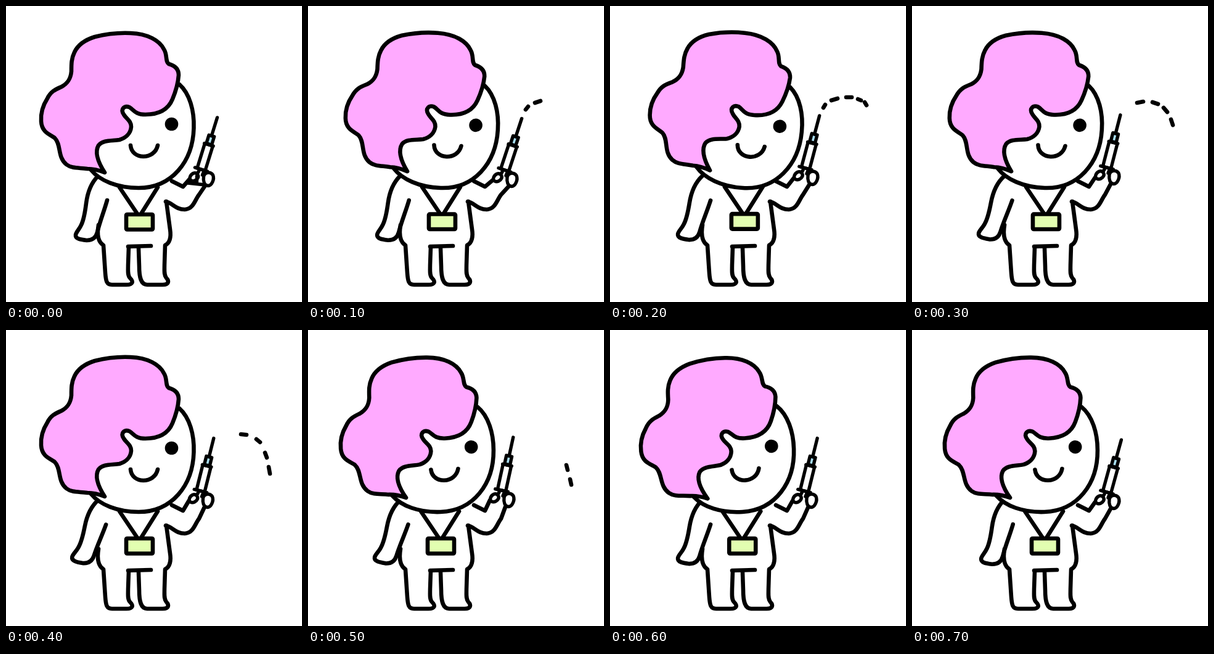
An HTML page that plays this animation: 480x480 px, repeating every 0.8 s.

```html
<!DOCTYPE html>
<html lang="en">
<head>
<meta charset="utf-8">
<title>Nurse with syringe</title>
<style>
  html, body { margin: 0; width: 100%; height: 100%; overflow: hidden; background: #fff; }
  svg { display: block; width: 100%; height: 100%; }
  .ink { fill: none; stroke: #000; stroke-width: 6.6; stroke-linecap: round; stroke-linejoin: round; }
  .thin { stroke-width: 5.4; }
  .white { fill: #fff; }
</style>
</head>
<body>
<svg viewBox="0 0 480 480">
  <g class="ink">
    <!-- legs and torso -->
    <path d="M150 355C147 373 150 383 158 388L161 433C162 446 163 452 172 452H195C206 452 207 447 201 441C197 437 198 429 198 420L199 391"/>
    <path d="M215 393L216 422C216 441 219 452 229 452H254C264 452 265 446 260 441C256 436 257 429 257 420L258 388C266 384 268 375 266 362L260 317"/>
    <path d="M198 390L235 389"/>
    <path id="arm" d="M149 276C137 288 132 304 130 320C128 336 126 347 122 355C119 362 114 366 113 371C112 378 122 379 131 380C141 380 146 375 148 367C152 350 159 333 164 315"/>
    <g id="badge">
      <path d="M184 294L213 337M246 294L219 337"/>
      <rect x="195" y="338" width="43" height="24.500" rx="1.500" fill="#e2feb1"/>
    </g>
    <!-- raised arm -->
    <path id="sleeve"/>
    <g id="head">
      <path class="white" d="M281 127C298 142 305.500 170 304.500 198C303 252 269 295 215 295C180 295 152 283 138 266"/>
      <path fill="#ffaaff" d="M160 270C150 266 142 264 132 264C119 262 107 264 98 257C83 245 90 225 79 214C71 208 58 205 57 187C56 173 60 161 67 150C73 138 81 135 90 131C101 125 105 117 106 106C106 94 106 85 111 75C117 62 128 55 144 50C164 45 181 43 202 44C230 45 249 56 256 70C262 79 258 90 264 94C275 97 280 103 280 112C279 126 275 139 270 151C263 168 247 176 226 176C209 176 207 168 200 164C192 161 185 167 191 176C195 183 203 186 203 196C202 207 194 214 184 217C172 219 157 217 150 226C143 238 151 256 160 270Z"/>
      <circle cx="268.500" cy="191.500" r="10.800" fill="#000" stroke="none"/>
      <path d="M202 226C204 250 241 250 246 226"/>
    </g>
    <g id="syringe" class="thin">
      <path class="white" d="M-6.800 0V-42H6.800V0Z"/>
      <path fill="#a9def2" d="M-4.500 -43V-57H4.500V-43Z"/>
      <path d="M-10.500 0H10.500M-7.500 -42H7.500M0 -57V-88"/>
    </g>
    <g id="hand" class="thin">
      <path d="M313 266L310 271M321 267L319 272"/>
      <path class="white" d="M311 271C307 266 301 270 299 275C297 281 303 283 307 281C311 279 314 275 311 271Z"/>
      <path class="white" d="M321 275C322 267 332 266 336 272C339 279 334 289.500 328 289.500C322 289 320 282 321 275Z"/>
      <path id="thumb" d="M295 285L323 288M310 274L310 284"/>
    </g>
    <path id="drops"/>
  </g>
</svg>
<script>
  const STEP = 100;
  const LOOP = 800;
  const PIVOT = [215, 300];
  const REST = [317, 263];

  const tilt = [0, 1.9, 3.7, 1.9, 0, -2, -3.5, -2];
  // syringe: base x, base y, lean in degrees
  const grip = [
    [316.5, 265, 17.2], [319, 266, 18.3], [317, 263, 14.9], [316, 262, 14.4],
    [315.5, 261, 14], [314, 260, 12.3], [315, 261, 13.9], [316, 263, 15.4]
  ];
  const spray = {
    1: "M353 168L357 163M368 157L377 154",
    2: "M346 165L349 160M359 153L369 150M383 148L392 148M402 151L407 153M413 156L416 161",
    3: "M365 157L375 155M390 156L399 159M408 165L414 172M420 184L423 193",
    4: "M381 169L390 170M406 177L412 182M420 199L423 207M426 222L428 233",
    5: "M419 219L421 227M425 242L427 251"
  };

  const el = id => document.getElementById(id);
  const move = (id, value) => el(id).setAttribute("transform", value);

  function draw(time) {
    const i = Math.floor((time % LOOP) / STEP);
    const [x, y, lean] = grip[i];
    const dx = x - REST[0];
    const dy = y - REST[1];
    const swing = 2 * (1 - Math.cos(2 * Math.PI * i / 8));

    move("head", `rotate(${tilt[i]} ${PIVOT})`);
    move("arm", `rotate(${swing} 155 288)`);
    move("badge", `translate(${tilt[i] / 2} ${-Math.max(0, tilt[i]) / 4})`);
    move("syringe", `translate(${x} ${y}) rotate(${lean})`);
    move("hand", `translate(${dx} ${dy})`);
    el("sleeve").setAttribute("d",
      `M269 284L287 293L${298 + dx} ${279 + dy}` +
      `M259 317C271 320 275 330 290 330C304 329 306 315 313 306L${323 + dx} ${290 + dy}`);
    el("thumb").style.display = i === 0 ? "" : "none";
    el("drops").setAttribute("d", spray[i] || "");
  }

  function tick() {
    draw(performance.now());
    requestAnimationFrame(tick);
  }
  tick();
</script>
</body>
</html>
```
